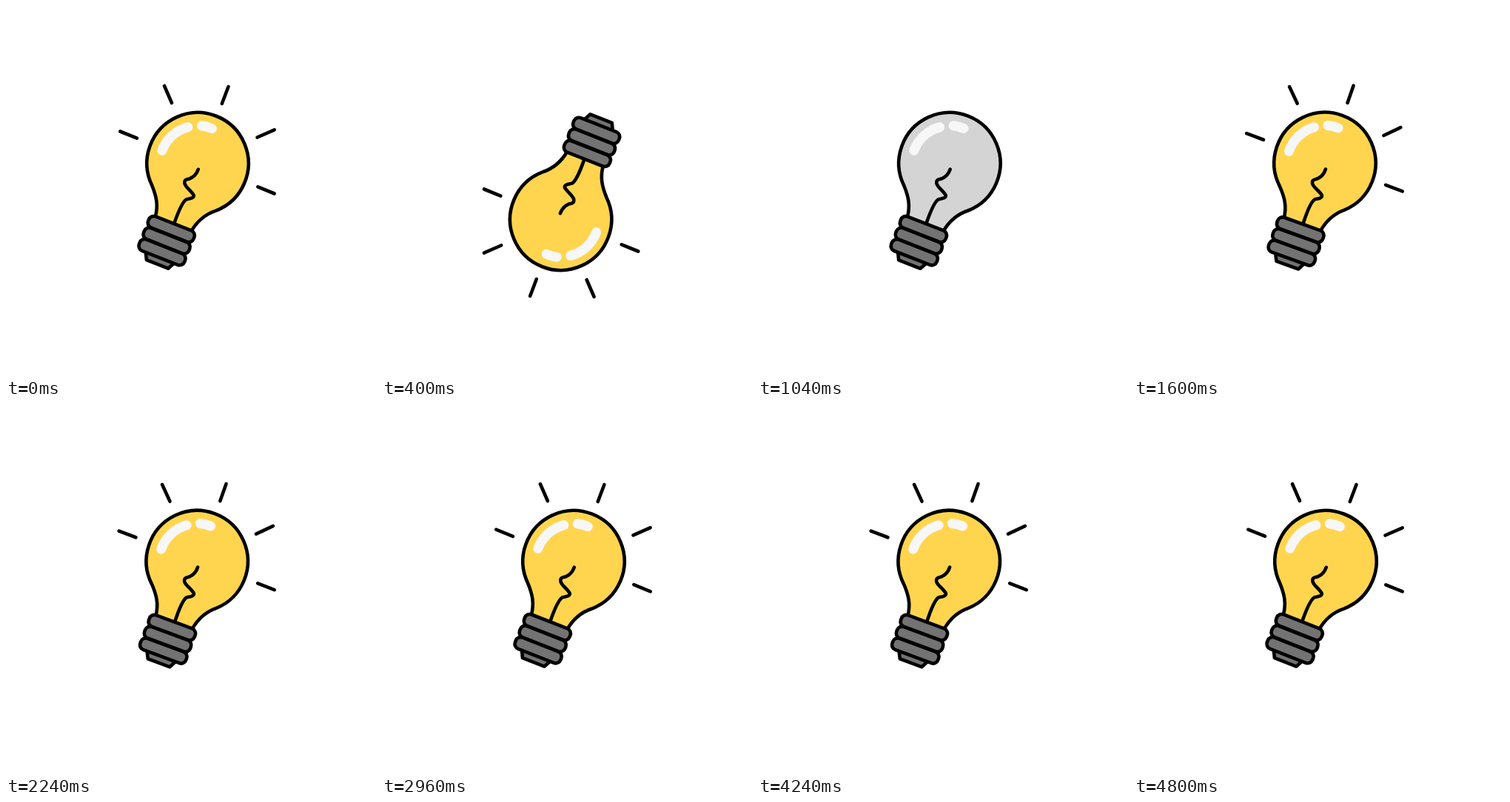
Write an HTML page that moves like this. It is 500 by 500 pixels and loops after 4.88 s.

```html
<!DOCTYPE html>
<html lang="en">
<head>
<meta charset="utf-8">
<title>Light bulb</title>
<style>
  html, body { margin: 0; width: 100%; height: 100%; overflow: hidden; background: #fff; }
  svg { display: block; width: 100vw; height: 100vh; }
  .line { fill: none; stroke: #000; stroke-width: 4.6; stroke-linecap: round; stroke-linejoin: round; }
  .shine { fill: none; stroke: #f7f7f7; stroke-width: 13; stroke-linecap: round; }
  .metal { fill: #737373; }
</style>
</head>
<body>
<svg viewBox="0 0 500 500">
  <g id="lamp">
    <path id="rays" class="line" d="M154.3 169.5L177 178.7M214 108L224 131M300.5 109L291.8 132M362.7 167.3L339.5 177.5M340.3 244.3L362.7 253.5"/>
    <g transform="translate(259 212.6) rotate(21.5)">
      <path id="glass" class="line" d="M-26.6 89C-28.5 72 -35.5 62 -46.4 50.5A68.6 68.6 0 1 1 46.4 50.5C35 60 28 72 25.5 89Z"/>
      <path class="shine" d="M-51.1 1.5A51.2 51.2 0 0 1 -30.1 -40.8M-13.7 -49.2A51.2 51.2 0 0 1 .8 -50.8"/>
      <path class="line" d="M3.7 7.3C3.9 13 1.9 19 -2.1 23C-6 26 -9.2 27 -6.2 32C-3.2 36 5.8 38 10.8 42C13.6 46 5.8 49 3.6 51C.6 55 -.6 66 .2 87"/>
      <path class="line metal" d="M-22 136L-16.5 146.8L15 146.8L20.5 136Z"/>
      <g id="base"></g>
    </g>
  </g>
</svg>
<script>
  const LOOP = 4880, STEP = 80;
  const SPIN_START = 80, SPIN_END = 720;
  const DARK_FROM = 640, DARK_TO = 1120;
  const SWAY_START = 840, SWAY_PERIOD = 2000, SWAY = 1.85;

  const get = id => document.getElementById(id);
  const lamp = get('lamp'), rays = get('rays'), glass = get('glass'), base = get('base');

  for (let i = 0; i < 3; i++) {
    const ring = document.createElementNS('http://www.w3.org/2000/svg', 'rect');
    const box = { x: -33.6, y: 87.7 + i * 16.7, width: 65.9, height: 16.4, rx: 7, class: 'line metal' };
    for (const key in box) ring.setAttribute(key, box[key]);
    base.append(ring);
  }

  const smooth = p => {
    p = Math.min(1, Math.max(0, p));
    return p * p * (3 - 2 * p);
  };

  function angleAt(t) {
    const spin = 360 * smooth((t - SPIN_START) / (SPIN_END - SPIN_START));
    const phase = Math.max(0, t - SWAY_START) / SWAY_PERIOD;
    return spin - SWAY * (1 - Math.cos(2 * Math.PI * phase)) / 2;
  }

  function draw(now) {
    const t = Math.floor(now % LOOP / STEP) * STEP;
    const lit = t < DARK_FROM || t >= DARK_TO;
    lamp.setAttribute('transform', `rotate(${angleAt(t)} 250.3 250.5)`);
    glass.style.fill = lit ? '#ffd54f' : '#d4d4d4';
    rays.style.display = lit ? '' : 'none';
  }

  let start;
  function tick(now) {
    start ??= now;
    draw(now - start);
    requestAnimationFrame(tick);
  }
  draw(0);
  requestAnimationFrame(tick);
</script>
</body>
</html>
```
